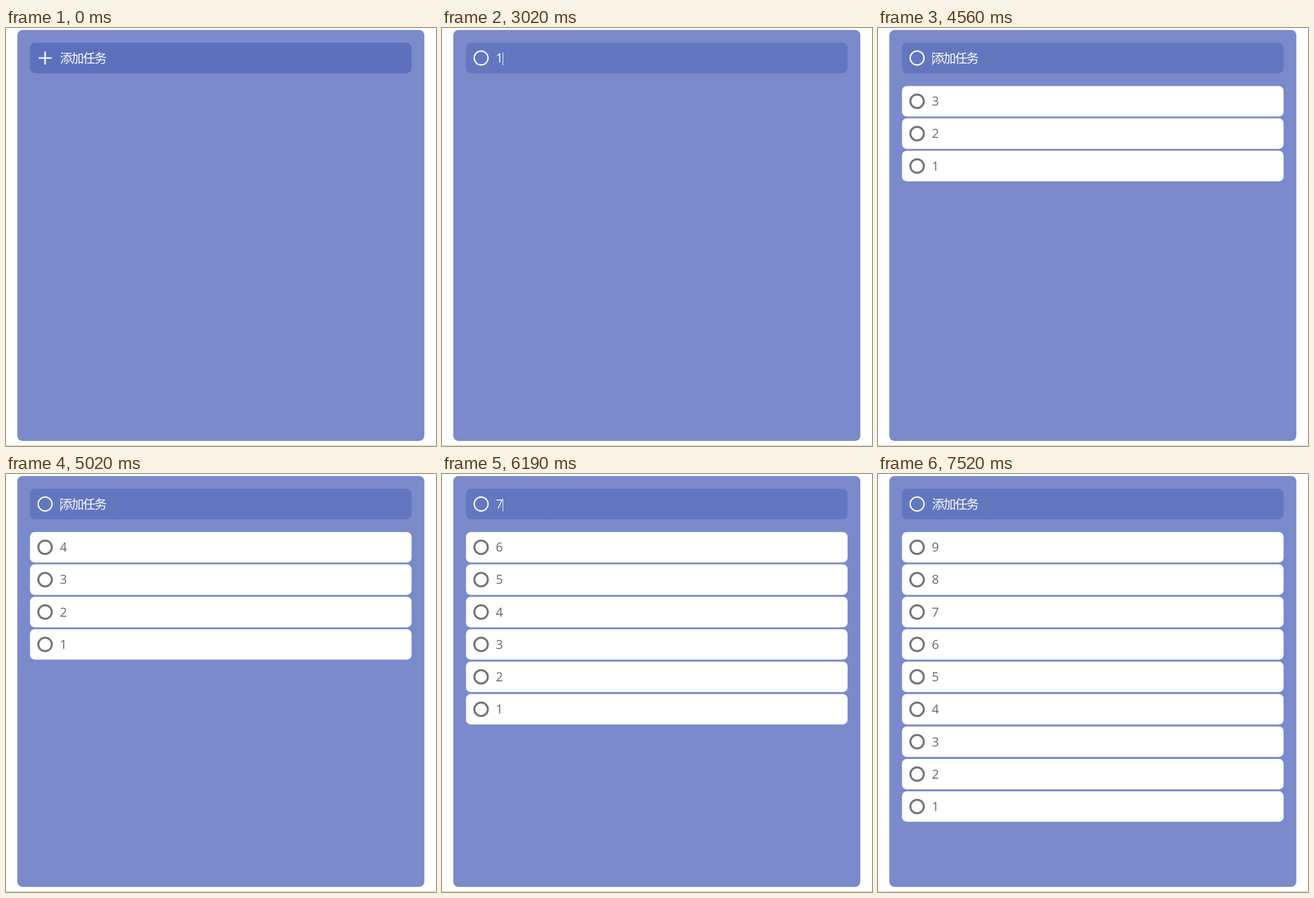
These frames come from a looping animation (759 px wide and 738 px high, 8 s). An HTML page:

```html
<!DOCTYPE html>
<html lang="zh-CN">
<head>
<meta charset="utf-8">
<title>任务列表</title>
<style>
  html, body { margin: 0; width: 100%; height: 100%; overflow: hidden; background: #fff; }
  svg { display: block; width: 100%; height: 100%; }
  text { font: 22px "Open Sans", "Noto Sans", sans-serif; }
  .input { fill: #fff; }
  .hint { font-family: "Noto Sans CJK SC", "Noto Sans CJK", sans-serif; letter-spacing: -1.8px; }
  .ring { fill: none; stroke: #fff; stroke-width: 2.4; }
  .row rect { fill: #fff; }
  .row circle { fill: none; stroke: #767279; stroke-width: 3.5; }
  .row text { fill: #69696f; }
</style>
</head>
<body>
<svg viewBox="0 0 759 738">
  <rect x="20" y="3.5" width="718.4" height="725.5" rx="9" fill="#7a8aca"/>
  <rect y="737" width="759" height="1" fill="#c6c6c6"/>
  <rect id="bar" x="42.3" y="26" width="673.6" height="54" rx="9"/>
  <path id="plus" d="M57.5 53h23M69 41.5v23" stroke="#fff" stroke-width="2.6"/>
  <circle id="ring" class="ring" cx="69" cy="53" r="12.2"/>
  <text id="hint" class="input hint" x="95.3" y="61.3">添加任务</text>
  <text id="typed" class="input" x="95" y="61"></text>
  <rect id="caret" y="43" width="1" height="23" fill="#fff"/>
  <g id="list"></g>
  <path id="arrow" d="M0 0v17l4-3.8 2.7 6 2.6-1.2-2.6-5.8h5.3z" fill="#fff" stroke="#333" stroke-width="1"/>
  <path id="beam" d="M-3.5 -7.5h2.5l1 1 1-1h2.5M0 -6.5v13M-3.5 7.5h2.5l1-1 1 1h2.5" fill="none" stroke="#787a8c" stroke-width="1.1"/>
</svg>
<script>
const LOOP = 8000, ENTER = 70, CLICK = 760, MOVES = 10;
// Per task: when its digit is typed and when it is added
const TASKS = [[3020, 3330], [3640, 4020], [4330, 4560], [4870, 5020], [5340, 5430],
               [5740, 5870], [6190, 6270], [6590, 6740], [6990, 7120]];
// Caret toggles between keystrokes; it starts visible on click
const BLINKS = [1310, 1860, 2410, 2940, 3560, 4170, 7520];
const PATH = [[648, 698], [228, 130], [192, 60]];

const $ = id => document.getElementById(id);
const show = (id, on) => $(id).setAttribute('visibility', on ? 'visible' : 'hidden');

const rows = TASKS.map((_, i) => {
  const g = document.createElementNS('http://www.w3.org/2000/svg', 'g');
  g.setAttribute('class', 'row');
  g.setAttribute('transform', `translate(0 ${102.4 + i * 57.22})`);
  g.innerHTML = '<rect x="42.3" width="673.6" height="53.8" rx="8.5"/>' +
    '<circle cx="69" cy="26.9" r="11.9"/><text x="95" y="34.8"></text>';
  $('list').append(g);
  return g;
});

function caretOn(t) {
  const key = TASKS.reduce((last, [type]) => type <= t ? type : last, CLICK);
  const flips = BLINKS.filter(b => b > key && b <= t).length;
  return t >= CLICK && flips % 2 === 0;
}

function drawPointer(t) {
  const step = Math.floor((t - ENTER) / ((CLICK - ENTER) / (MOVES - 1)) + 1e-6);
  const p = Math.min(1, Math.max(0, step / (MOVES - 2)));
  const u = 1 - (1 - p) ** 2, v = 1 - u;
  const [x, y] = [0, 1].map(k => v * v * PATH[0][k] + 2 * u * v * PATH[1][k] + u * u * PATH[2][k]);
  const shown = t >= ENTER, overBar = y < 80;
  show('arrow', shown && !overBar);
  show('beam', shown && overBar);
  for (const id of ['arrow', 'beam']) $(id).setAttribute('transform', `translate(${x} ${y})`);
}

function draw(t) {
  const focused = t >= CLICK;
  const count = TASKS.filter(([, add]) => add <= t).length;
  const typing = TASKS.findIndex(([type, add]) => type <= t && t < add);
  const empty = typing < 0;

  $('bar').setAttribute('fill', focused ? '#6277c0' : '#5c70bd');
  show('plus', !focused);
  show('ring', focused);
  show('hint', empty);
  $('typed').textContent = empty ? '' : typing + 1;
  $('caret').setAttribute('x', empty ? 96 : 107);
  show('caret', caretOn(t));

  rows.forEach((row, i) => {
    row.setAttribute('visibility', i < count ? 'visible' : 'hidden');
    row.lastChild.textContent = count - i;
  });
  drawPointer(t);
}

const start = performance.now();
function tick() {
  draw((performance.now() - start) % LOOP);
  requestAnimationFrame(tick);
}
tick();
</script>
</body>
</html>
```
